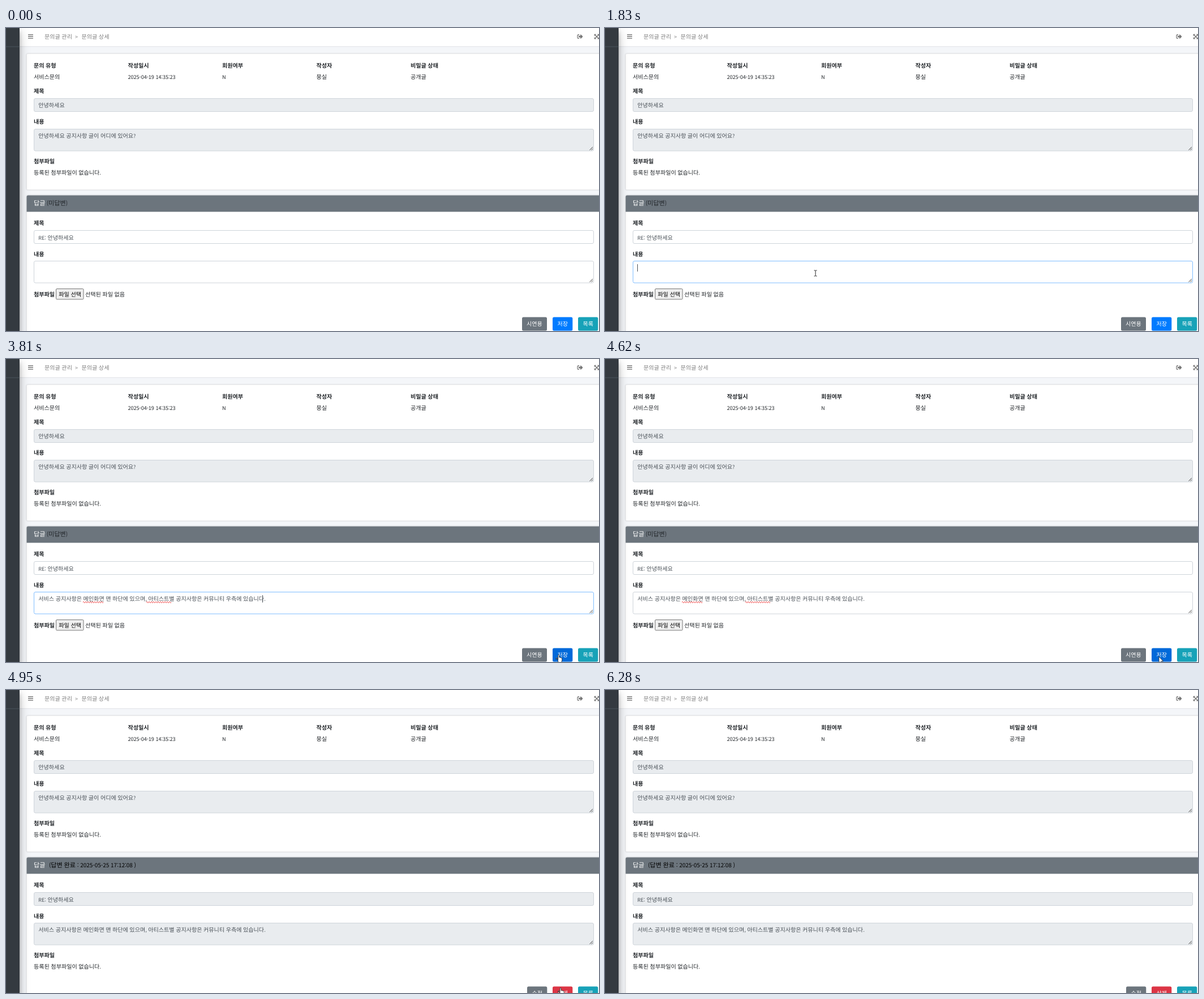
An HTML page for the animation above (7020 ms loop, 1048 by 535 pixels).

```html
<!DOCTYPE html>
<html lang="ko">
<head>
<meta charset="utf-8">
<title>문의글 상세</title>
<style>
  html, body { margin: 0; height: 100%; overflow: hidden; background: #fff; }
  svg { display: block; width: 100vw; height: 100vh; }
  text {
    font: 10.08px "Noto Sans CJK KR", "Noto Sans KR", "Noto Sans CJK", "Noto Sans CJK JP", sans-serif;
    fill: #212529; white-space: pre; text-rendering: geometricPrecision;
  }
  .latin { font-size: 89.7%; }
  .label { font-weight: 700; }
  .value { fill: #495057; }
  .title { font-size: 11.09px; }
  .button { fill: #fff; text-anchor: middle; }
  .muted { fill: #7f7f7f; }
  .card { fill: #fff; filter: drop-shadow(0 .6px .9px rgba(0,0,0,.25)); }
  .side { fill: #343a40; }
  .far { filter: drop-shadow(0 8.8px 8.8px rgba(0,0,0,.25)); }
  .near { filter: drop-shadow(0 6.3px 3.15px rgba(0,0,0,.22)); }
</style>
</head>
<body>
<svg id="stage" viewBox="0 0 1048 535"></svg>
<script>
const LOOP = 7020;
const REPLY = '서비스 공지사항은 메인화면 맨 하단에 있으며, 아티스트별 공지사항은 커뮤니티 우측에 있습니다.';
const NO_FILE = '등록된 첨부파일이 없습니다.';
const GREY = '#6c757d', TEAL = '#17a2b8';

// Latin runs are set slightly smaller than the Hangul around them.
const text = (x, y, s, cls = '', attrs = '') =>
  `<text x="${x}" y="${y}" class="${cls}" ${attrs}>` +
  s.replace(/[ -~]+/g, run => `<tspan class="latin">${run.replace('>', '&gt;')}</tspan>`) + '</text>';

const rect = (x, y, w, h, attrs = '') =>
  `<rect x="${x}" y="${y}" width="${w}" height="${h}" ${attrs}/>`;

const field = (y, h, fill, id = '') =>
  rect(49.5, y, 989, h, `id="${id}" rx="2.5" fill="${fill}" stroke="#ced4da"`);

const area = (y, fill, id) => field(y, 38.5, fill, id) +
  `<path d="M1031.5 ${y + 37}l5.5-5.5m-2.5 5.5l2.5-2.5" stroke="#444" fill="none"/>`;

const button = (x, y, w, fill, label, id = '') =>
  rect(x, y, w, 24, `id="${id}" rx="2.5" fill="${fill}"`) + text(x + w / 2, y + 15.7, label, 'button');

const wave = (x, n) =>
  `<path d="M${x} 429.5${'q1-2.6 2 0t2 0'.repeat(n)}" fill="none" stroke="#e33" stroke-width=".9"/>`;

const details = [
  ['문의 유형', '서비스문의'], ['작성일시', '2025-04-19 14:35:23'], ['회원여부', 'N'],
  ['작성자', '뭉실'], ['비밀글 상태', '공개글'],
].map(([name, value], i) => {
  const x = 49 + i * 166.5;
  return text(x, 70, name, 'label') + text(x, 90, value);
}).join('');

const corner = a => `<path d="M-4.4-4.4h3.6l-3.6 3.6z" transform="rotate(${a})"/>`;

stage.innerHTML = `
<g id="page">
  ${rect(0, 0, 1048, 535, 'fill="#f4f6f9"')}
  ${rect(36.5, 45.5, 1030, 240, 'class="card" rx="2.5"')}
  ${details}
  ${text(49, 115, '제목', 'label')}
  ${field(124.5, 23, '#e9ecef')}
  ${text(57.3, 140, '안녕하세요', 'value')}
  ${text(49, 169, '내용', 'label')}
  ${area(178.5, '#e9ecef')}
  ${text(57.3, 194, '안녕하세요 공지사항 글이 어디에 있어요?', 'value')}
  ${text(49, 239, '첨부파일', 'label')}
  ${text(49, 259, NO_FILE)}
  ${rect(36.5, 295.5, 1030, 280, 'class="card" rx="2.5"')}
  <path d="M36.5 324.5V298q0-2.5 2.5-2.5h1020v29z" fill="${GREY}"/>
  ${text(49, 313, '답글', 'title', 'style="fill:#fff"')}
  ${text(49, 348, '제목', 'label')}
  ${text(49, 403, '내용', 'label')}
  <g id="pending">
    ${text(71.7, 313, '(미답변)', 'title')}
    ${field(357.5, 23, '#fff')}
    ${area(411.5, '#fff', 'editor')}
    <g id="typed">${wave(136, 9)}${wave(248, 11.5)}${text(57.3, 427, REPLY, 'value')}</g>
    ${rect(0, 417, 1, 13, 'id="caret" fill="#495057"')}
    ${text(49, 474, '첨부파일', 'label')}
    ${rect(88.5, 460.5, 48.5, 18.5, 'rx="1.5" fill="#efefef" stroke="#767676"')}
    ${text(93.3, 474, '파일 선택', '', 'style="fill:#000"')}
    ${text(140, 474, '선택된 파일 없음')}
    ${button(912, 510.5, 44, GREY, '시연용')}
    ${button(966, 510.5, 35.3, '#007bff', '저장', 'save')}
    ${button(1011, 510.5, 35.3, TEAL, '목록')}
  </g>
  <g id="done">
    ${text(76, 313, '(답변 완료 : 2025-05-25 17:12:08 )', 'title', 'style="fill:#000"')}
    ${field(357.5, 23, '#e9ecef')}
    ${area(411.5, '#e9ecef')}
    ${text(57.3, 427, REPLY, 'value')}
    ${text(49, 472, '첨부파일', 'label')}
    ${text(49, 492, NO_FILE)}
    ${button(921, 523.5, 35.3, GREY, '수정')}
    ${button(966, 523.5, 35.3, '#dc3545', '삭제', 'remove')}
    ${button(1011, 523.5, 35.3, TEAL, '목록')}
  </g>
  ${text(57.3, 373.5, 'RE: 안녕하세요', 'value')}
</g>
${rect(24, 0, 1024, 33, 'fill="#fff"')}
${rect(24, 32.3, 1024, 1, 'fill="#dee2e6"')}
<path d="M39 12h9M39 15.2h9M39 18.4h9" stroke="#777" stroke-width="1.4"/>
${text(68, 19, '문의글 관리', 'muted')}${text(122, 19, '>', 'muted')}${text(133.5, 19, '문의글 상세', 'muted')}
<g id="exit" fill="#777"><path transform="scale(.0198)" d="M497 273L329 441c-15 15-41 4-41-17v-96H152q-24 0-24-24v-96q0-24 24-24h136V88c0-21 26-32 41-17l168 168q14 17 0 34zM192 436v-40q0-12-12-12H96q-32 0-32-32V160q0-32 32-32h84q12 0 12-12V76q0-12-12-12H96Q0 64 0 160v192q0 96 96 96h84q12 0 12-12z"/></g>
<g id="chrome">
  <g transform="translate(1044 15.2)" fill="#777">
    <path d="M-3-3L3 3M3-3L-3 3" stroke="#777" stroke-width="1.4"/>
    ${[0, 90, 180, 270].map(corner).join('')}
  </g>
  ${rect(0, 0, 24, 700, 'class="side far"')}
  ${rect(0, 0, 24, 700, 'class="side near"')}
  ${rect(0, 32.5, 24, 1, 'fill="#4b545c"')}
</g>
<g id="cursor" fill="#fff" stroke="#222" stroke-width=".8" stroke-linejoin="round">
  <path id="arrow" d="M0 0V11L2.5 8.8 4.2 12.6 5.8 11.9 4.2 8.1H7.6z"/>
  <path id="beam" fill="none" stroke-width="1" d="M-2.5-5H-.6L0-4.4.6-5H2.5M0-4.4V4.4M-2.5 5H-.6L0 4.4.6 5H2.5"/>
  <path id="hand" d="M0 9V1.4Q0 .4 1 .4T2 1.4V5Q3.2 4.4 4 5.4 5.2 4.9 5.8 5.9 7 5.6 7 7V10Q6.6 12 5.6 14H.4Q-2-.6-3.6 8.4-3.6 6.4-1.8 7.2z"/>
</g>`;

// Pointer path: time, x, y
const PATH = [
  [1000, 540, 507], [1200, 470, 476], [1400, 402, 446], [1640, 372, 433],
  [2600, 372, 433], [2720, 425, 434], [2980, 651, 446], [3340, 906, 473],
  [3480, 948, 499], [3680, 973, 519], [3940, 979, 525.5],
  [5770, 979, 525.5], [6000, 988, 531], [6130, 996, 537], [6200, 997, 550],
];

function pointerAt(t) {
  const i = PATH.findIndex(p => p[0] > t);
  if (i < 1) return PATH.at(i).slice(1);
  const [a, b] = [PATH[i - 1], PATH[i]];
  const k = (t - a[0]) / (b[0] - a[0]);
  return [a[1] + (b[1] - a[1]) * k, a[2] + (b[2] - a[2]) * k];
}

const ids = Object.fromEntries([...stage.querySelectorAll('[id]')].map(e => [e.id, e]));
const show = (id, on) => ids[id].style.display = on ? '' : 'none';
const ramp = (t, from, to) => Math.min(1, Math.max(0, (t - from) / (to - from)));
const mix = (from, to, k) => `color-mix(in srgb, ${to} ${k * 100}%, ${from})`;
const within = (t, from, to) => t >= from && t < to;

function draw(now) {
  const t = now % LOOP;
  const blank = within(t, 4890, 4950);
  const typed = t >= 2270;

  show('page', !blank);
  show('chrome', !blank);
  show('pending', t < 4890);
  show('done', t >= 4950);
  show('typed', typed);
  show('caret', within(t, 1700, 2800) || within(t, 3340, 3870));
  ids.caret.setAttribute('x', typed ? 453 : 57);
  ids.exit.setAttribute('transform', `translate(${blank ? 1021.3 : 1009.4} 10.1)`);

  ids.editor.style.stroke = mix('#ced4da', '#80bdff', ramp(t, 1690, 1830) - ramp(t, 4140, 4290));
  ids.save.style.fill = mix('#007bff', '#0069d9', ramp(t, 3650, 3800));
  ids.remove.style.fill = mix('#dc3545', '#c82333', ramp(t, 4950, 5140) - ramp(t, 6130, 6280));

  // The pointer advances in small steps, as in a screen recording.
  const [x, y] = pointerAt(t - (t + 12) % 68);
  const beam = y > 411 && y < 451;
  const hand = !beam && x > 966 && y > 510 && !within(t, 4620, 4950);
  show('cursor', within(t, 1000, 6250));
  show('beam', beam);
  show('hand', hand);
  show('arrow', !beam && !hand);
  ids.cursor.setAttribute('transform', `translate(${x.toFixed(1)} ${y.toFixed(1)})`);
  requestAnimationFrame(draw);
}
requestAnimationFrame(draw);
</script>
</body>
</html>
```
